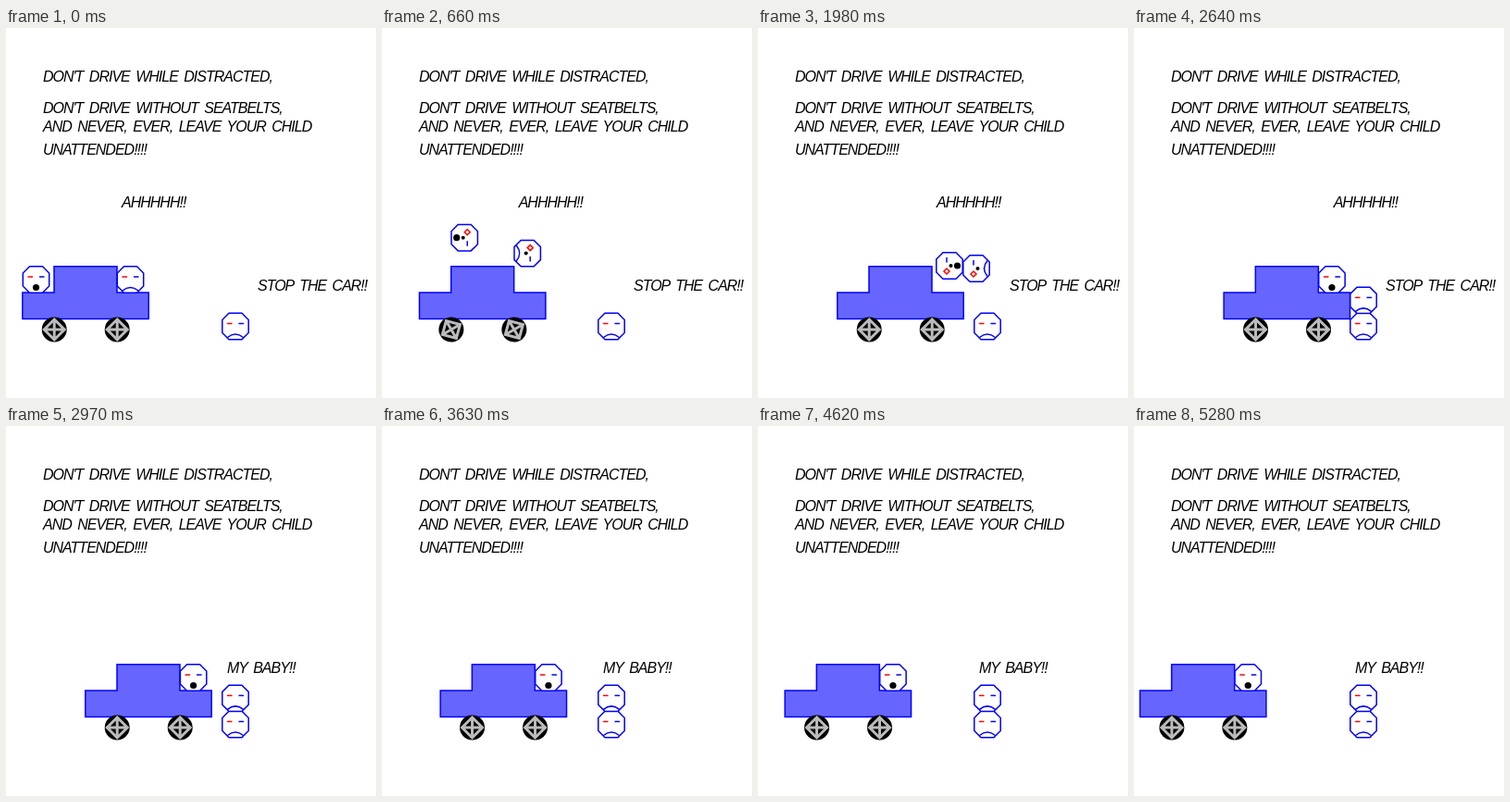
Animation, 400 px wide and 400 px high, one loop 5610 ms. Source, as an HTML page:

```html
<!DOCTYPE html>
<html lang="en">
<head>
<meta charset="utf-8">
<title>Drive safely</title>
<style>
  html, body { margin: 0; width: 100%; height: 100%; overflow: hidden; background: #fff; }
  svg { display: block; width: 100vw; height: 100vh; }
  text {
    font: italic 16px "Liberation Sans", Arial, sans-serif;
    letter-spacing: -1px; word-spacing: 3px;
  }
  .line { fill: none; stroke: #00f; stroke-width: 1.5; }
  .red { stroke: #f00; }
</style>
</head>
<body>
<svg viewBox="0 0 400 400">
  <defs>
    <g id="face">
      <path class="line" style="fill:#fff" d="M-7-14.2H7L14.2-7V7L7 14.2H-7L-14.2 7V-7Z"/>
      <path class="line" d="M3.5-3H9"/>
    </g>
    <path id="eye" class="line red" d="M-9-3H-3.5"/>
    <path id="frown" class="line" d="M-8.5 12Q0 5 8.5 12"/>
    <g id="sideways">
      <path class="line red" d="M-6-6L-3-3L-6 0L-9-3Z"/>
      <circle cy="1.5" r="2"/>
    </g>
    <g id="wheel">
      <circle r="13.5"/>
      <path d="M0-11L11 0L0 11L-11 0ZM0-11V11M-11 0H11" fill="none" stroke="#bbb" stroke-width="3"/>
    </g>
  </defs>

  <text x="40" y="58">DON'T DRIVE WHILE DISTRACTED,</text>
  <text x="40" y="92">DON'T DRIVE WITHOUT SEATBELTS,</text>
  <text x="40" y="112">AND NEVER, EVER, LEAVE YOUR CHILD</text>
  <text x="40" y="137">UNATTENDED!!!!</text>
  <text id="scream" y="194">AHHHHH!!</text>
  <text id="stop" x="272" y="284">STOP THE CAR!!</text>
  <text id="baby" x="239" y="267">MY BABY!!</text>

  <g id="car">
    <path d="M0 286H34.2V257.7H102.2V286H136.4V314.4H0Z" fill="#66f" stroke="#00f" stroke-width="1.5"/>
    <g transform="translate(34.4 326)"><use class="spin" href="#wheel"/></g>
    <g transform="translate(102.4 326)"><use class="spin" href="#wheel"/></g>
  </g>

  <g transform="translate(248 322.5)">
    <use href="#face"/><use href="#eye"/><use href="#frown"/>
  </g>
  <g id="child">
    <use href="#face"/><use class="level" href="#eye"/><use class="turned" href="#sideways"/>
    <use href="#frown"/>
  </g>
  <g id="driver">
    <use href="#face"/><use class="level" href="#eye"/><use class="turned" href="#sideways"/>
    <circle cy="8.5" r="3.6"/>
  </g>
</svg>
<script>
  const STEP = 330, COUNT = 17, UNIT = 11.333;
  const START = 17.8, LAND = 8;
  const $ = id => document.getElementById(id);

  // Flight paths, one point per step until landing
  const driverPath = [[32.5, 272], [60.8, 243.7], [89.2, 226.7], [126, 226.7], [163, 238],
                      [187, 246], [207, 257], [213, 266], [214.2, 272]];
  const childPath = [[134.5, 272], [146, 255], [157.2, 243.6], [182.5, 238], [208.2, 243.6],
                     [223, 250], [236, 260], [245, 273], [248, 294.4]];

  const show = (el, on) => el.style.display = on ? '' : 'none';

  function placeHead(el, [x, y], angle) {
    el.setAttribute('transform', `translate(${x} ${y}) rotate(${angle})`);
    const turned = angle % 180 === 90;
    show(el.querySelector('.turned'), turned);
    show(el.querySelector('.level'), !turned);
  }

  // Forward with one pause, then steadily in reverse
  const carUnits = k => k < 7 ? k : k <= LAND ? k - 1 : 15 - k;

  function draw(k) {
    const carX = START + carUnits(k) * UNIT;
    const flight = Math.min(k, LAND);
    const angle = flight * 45 % 360;
    const [dx, dy] = driverPath[flight];
    const seated = k >= LAND;

    $('car').setAttribute('transform', `translate(${carX} 0)`);
    document.querySelectorAll('.spin').forEach(w =>
      w.setAttribute('transform', `rotate(${Math.min(k, 6) * 30})`));
    placeHead($('driver'), [seated ? carX + 116.8 : dx, dy], angle);
    placeHead($('child'), childPath[flight], angle);

    $('scream').setAttribute('x', 125 + k * UNIT);
    show($('scream'), k <= LAND);
    show($('stop'), k <= LAND);
    show($('baby'), k > LAND);
  }

  let last = -1;
  const origin = performance.now();
  function tick() {
    const k = Math.floor((performance.now() - origin) / STEP) % COUNT;
    if (k !== last) draw(last = k);
    requestAnimationFrame(tick);
  }
  tick();
</script>
</body>
</html>
```
